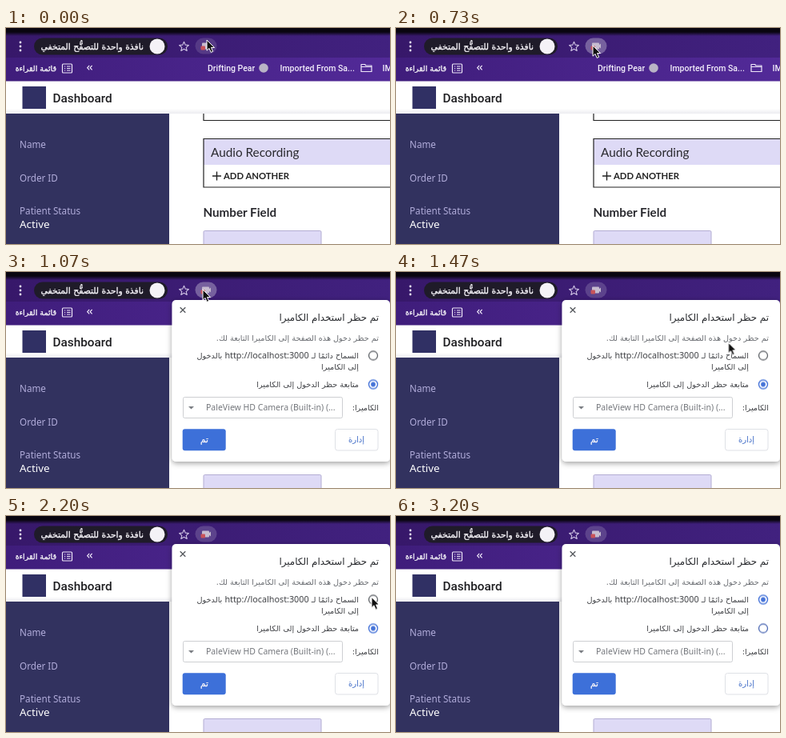
Recreate the animation shown at these times as an HTML page. Size 480x270 px, loop 3.34 s.

```html
<!DOCTYPE html>
<html lang="en">
<head>
<meta charset="utf-8">
<title>Camera permission</title>
<style>
  html, body { margin: 0; width: 100%; height: 100%; overflow: hidden; background: #fff; }
  svg { display: block; width: 100vw; height: 100vh; }

  .ar { font-family: "DejaVu Sans", sans-serif; direction: rtl; }
  .ui { font-family: Roboto, sans-serif; font-weight: 500; }
  .noto { font-family: "Noto Sans", sans-serif; }
  .lato { font-family: Lato, sans-serif; }
  .bold { font-weight: 700; }
  .semi { fill: #f5f3f8; stroke: #f5f3f8; stroke-width: .35px; }
  .mid { text-anchor: middle; }
  .bar { font-size: 10.5px; fill: #f3eefb; }
  .label { font-size: 11.7px; fill: #b2addb; }
  .body { font-size: 9.7px; fill: #404246; }
  .url { font-family: "Noto Sans", sans-serif; font-size: 10.8px; }

  .dialog, .after, .before, .hover, .cursor { animation: 3340ms infinite; }
  .dialog { animation-name: open; animation-timing-function: step-end; }
  .after { animation-name: appear; animation-timing-function: step-end; }
  .before { animation-name: vanish; animation-timing-function: step-end; }
  .hover { animation-name: hover; }
  .cursor { animation-name: move; animation-timing-function: ease-in-out; }

  @keyframes open { 0% { visibility: hidden } 32%, 100% { visibility: visible } }
  @keyframes appear { 0% { opacity: 0 } 71.8%, 100% { opacity: 1 } }
  @keyframes vanish { 0% { opacity: 1 } 71.8%, 100% { opacity: 0 } }
  @keyframes hover {
    0%, 12% { fill-opacity: .13 }
    20%, 36% { fill-opacity: .3 }
    42%, 100% { fill-opacity: .17 }
  }
  @keyframes move {
    0%, 2% { transform: translate(251px, 15px) }
    10%, 34% { transform: translate(246px, 22px) }
    46.5% { transform: translate(430px, 94px) }
    54.5% { transform: translate(431px, 95.5px) }
    63%, 74% { transform: translate(457px, 101.5px) }
    84%, 100% { transform: translate(492px, 114px) }
  }
</style>
</head>
<body>
<svg viewBox="0 0 480 270">
  <defs>
    <linearGradient id="tools">
      <stop offset="0" stop-color="#37186a"/>
      <stop offset="1" stop-color="#41217f"/>
    </linearGradient>
    <linearGradient id="dark" x2="0" y2="1">
      <stop offset=".5" stop-color="#09050f"/>
      <stop offset="1" stop-color="#09050f" stop-opacity="0"/>
    </linearGradient>
    <linearGradient id="marks">
      <stop offset="0" stop-color="#3f1d7b"/>
      <stop offset="1" stop-color="#522a98"/>
    </linearGradient>
    <linearGradient id="head" x2="0" y2="1">
      <stop offset=".85" stop-color="#fff"/>
      <stop offset="1" stop-color="#ececf0"/>
    </linearGradient>
    <filter id="shadow" x="-10%" y="-10%" width="120%" height="120%">
      <feDropShadow dx="0" dy="2" stdDeviation="3.5" flood-color="#000" flood-opacity=".38"/>
    </filter>
    <g id="on" fill="none" stroke="#4573d8" stroke-width="1.4">
      <circle r="5.5"/>
      <circle r="2.9" fill="#4573d8" stroke="none"/>
    </g>
    <circle id="off" r="5.5" fill="none" stroke-width="1.3"/>
  </defs>

  <!-- Page -->
  <rect width="480" height="270" fill="#fff"/>
  <g fill="none" stroke="#222" stroke-width="1.2">
    <path d="M247 104V115.5H482"/>
    <path d="M247 138.5H482V171H247Z" fill="#dedaf6" stroke="none"/>
    <path d="M482 138.5H247V199H482"/>
    <path d="M258 185H269M263.5 179.5V190.5" stroke-width="1.4"/>
  </g>
  <text class="lato" x="256" y="160.5" font-size="15.3" fill="#29292e">Audio Recording</text>
  <text class="lato bold" x="272" y="188.5" font-size="11.3" fill="#222">ADD ANOTHER</text>
  <text class="lato bold" x="246.5" y="236" font-size="15.2" fill="#29292e">Number Field</text>
  <rect x="247" y="253.5" width="147" height="30" rx="1.5" fill="#dedaf6" stroke="#b3add3"/>

  <rect y="107" width="204" height="163" fill="#32325f"/>
  <g class="noto">
    <text class="label" x="17" y="150">Name</text>
    <text class="label" x="17" y="191.5">Order ID</text>
    <text class="label" x="17" y="233">Patient Status</text>
    <text x="17" y="249.5" font-size="13.4" fill="#fff">Active</text>
  </g>

  <rect y="66" width="480" height="41" fill="url(#head)"/>
  <rect x="20.5" y="73" width="29.5" height="28" fill="#303064"/>
  <text class="ui" x="58.5" y="92.5" font-size="15.3" fill="#1d1d20">Dashboard</text>

  <!-- Browser bars -->
  <rect width="480" height="38" fill="url(#tools)"/>
  <rect width="480" height="10" fill="url(#dark)"/>
  <rect y="37" width="480" height="29.5" fill="url(#marks)"/>
  <g fill="#e9e2f5">
    <circle cx="18" cy="18" r="1.4"/>
    <circle cx="18" cy="23" r="1.4"/>
    <circle cx="18" cy="28" r="1.4"/>
  </g>
  <rect x="35" y="12.5" width="167" height="21" rx="10.5" fill="#1f1b29"/>
  <text class="ar semi" x="172" y="26.5" font-size="10.8">نافذة واحدة للتصفُّح المتخفي</text>
  <circle cx="189" cy="23" r="9.5" fill="#f4f2f7"/>
  <path d="M222.5 17.2L224.2 21.1 228.4 21.5 225.2 24.3 226.2 28.5 222.5 26.3 218.8 28.5 219.8 24.3 216.6 21.5 220.8 21.1Z"
        fill="none" stroke="#cdc1e2" stroke-width="1.1" stroke-linejoin="round"/>
  <rect class="hover" x="236.5" y="12.5" width="27" height="20" rx="10" fill="#fff"/>
  <g fill="#c6bccf">
    <rect x="245" y="18.5" width="9" height="8" rx="1"/>
    <path d="M253.5 21.5L256 19.5V25.5L253.5 23.5Z"/>
    <rect x="243.5" y="22.5" width="5.5" height="5" rx="1" fill="#c9545a"/>
  </g>

  <text class="ar semi" x="63" y="53.5" font-size="9.5">قائمة القراءة</text>
  <g fill="none" stroke="#eee7f8" stroke-width="1.2">
    <rect x="70.5" y="45" width="12" height="11" rx="1"/>
    <path d="M73 48H74.2M76 48H80.5M73 50.5H74.2M76 50.5H80.5M73 53H74.2M76 53H80.5"/>
    <path d="M104.2 47L101.7 49.7 104.2 52.4M107.6 47L105.1 49.7 107.6 52.4"/>
    <path d="M444 54.5V45.5H448.5L450 47H457V54.5ZM444 48.5H457" stroke-linejoin="round"/>
  </g>
  <g class="ui bar">
    <text x="252" y="53.8">Drifting Pear</text>
    <text x="342.5" y="53.8">Imported From Sa...</text>
    <text x="470.5" y="53.8">IM</text>
  </g>
  <circle cx="322" cy="50" r="5.8" fill="#b9b3c6"/>

  <!-- Permission dialog -->
  <g class="dialog">
    <rect x="207.5" y="35" width="272.5" height="202" rx="5" fill="#fff" filter="url(#shadow)"/>
    <path d="M217.7 44.2L224.3 50.8M224.3 44.2L217.7 50.8" stroke="#55585d" stroke-width="1.3"/>
    <text class="ar" x="466" y="61" font-size="11.9" fill="#26282c">تم حظر استخدام الكاميرا</text>
    <text class="ar body" x="466" y="86" style="fill:#696c71">تم حظر دخول هذه الصفحة إلى الكاميرا التابعة لك.</text>
    <text class="ar body" x="441" y="108">السماح دائمًا لـ <tspan class="url">http://localhost:3000</tspan> بالدخول</text>
    <text class="ar body" x="441" y="122">إلى الكاميرا</text>
    <text class="ar body" x="441" y="143.5">متابعة حظر الدخول إلى الكاميرا</text>
    <text class="ar body" x="466" y="172.5">الكاميرا:</text>

    <g transform="translate(459 104.5)">
      <use class="before" href="#off" stroke="#5f6368"/>
      <use class="after" href="#on"/>
    </g>
    <g transform="translate(459 140.5)">
      <use class="before" href="#on"/>
      <use class="after" href="#off" stroke="#4d69b4"/>
    </g>

    <rect x="221.5" y="156.5" width="199" height="26" rx="2" fill="#fff" stroke="#cdcfd2"/>
    <path d="M228 168H235L231.5 171.6Z" fill="#7b7e83"/>
    <text class="noto" x="250" y="173" font-size="10.5" fill="#74777c">PaleView HD Camera (Built-in) (...</text>

    <rect x="220.7" y="196.3" width="54" height="27" rx="3" fill="#3d70d9"/>
    <text class="ar semi mid" x="248" y="213" font-size="10.5">تم</text>
    <rect x="411.5" y="196.5" width="53.5" height="26.5" rx="3" fill="#fff" stroke="#dfe1e6"/>
    <text class="ar mid" x="438" y="213" font-size="10" fill="#4470c8">إدارة</text>
  </g>

  <g class="cursor">
    <path d="M0 0V13.2L3 10.4 5.2 15.4 7.6 14.3 5.5 9.5H9.6Z" fill="#111" stroke="#fff" stroke-width="1" stroke-linejoin="round"/>
  </g>
</svg>
</body>
</html>
```
